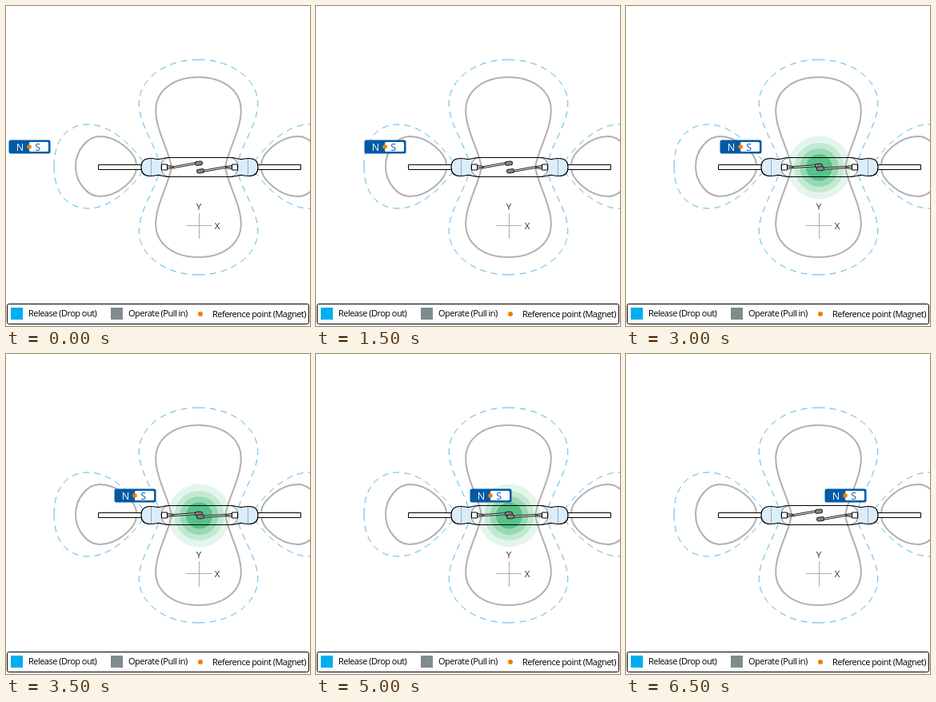
An HTML page with a canvas that plays this animation: 380x400 px, repeating every 8000 ms.

```html
<!DOCTYPE html>
<html lang="en">
<head>
<meta charset="utf-8">
<title>Reed switch and magnet</title>
<style>
html, body { margin: 0; width: 100%; height: 100%; overflow: hidden; background: #fff; }
canvas { display: block; }
</style>
</head>
<body>
<canvas id="stage" width="380" height="400"></canvas>
<script>
const ctx = document.getElementById("stage").getContext("2d");
const LOOP = 8000, STEP = 500, LAST_STEP = 13;
const FONT = '"Open Sans", "Noto Sans", sans-serif';
const GRAY = "#b0b0b0", SKY = "#5bb5e3", NAVY = "#005aa5", ORANGE = "#f08000";

const shapes = {
  operate: new Path2D("M0-112.5C32-112.5 53.3-95 53.3-71C53.3-47 37-21 33.5 0"),
  release: new Path2D("M0-134.5C44-134.5 74.3-108 74.3-80C74.3-52 51-25 48 0"),
  sideOperate: new Path2D("M-154 0C-154-20 -139-37.5-124-37.5C-101-37.5-78-16-78-2V0"),
  sideRelease: new Path2D("M-181 0C-181-35-163-52.5-138-52.5C-111-52.5-86-28-71-8"),
  bulb: new Path2D("M38-12C46-12 48-9.5 53-10C57-11 58-11 62-11C69-11 73-7 73 0V1H48V0C48-5 46-11 38-12Z"),
  outline: new Path2D("M0-12H38C46-12 48-9.5 53-10C57-11 58-11 62-11C69-11 73-7 73 0"),
  glassEnd: new Path2D("M38-12C46-11 48-5 48 0")
};

function at(x, y, draw, sx = 1, sy = 1) {
  ctx.save();
  ctx.translate(x, y);
  ctx.scale(sx, sy);
  draw();
  ctx.restore();
}

function mirrored(x, y, draw) {
  for (const sx of [1, -1]) for (const sy of [1, -1]) at(x, y, draw, sx, sy);
}

function stroke(path, color, width, dash = []) {
  ctx.strokeStyle = color;
  ctx.lineWidth = width;
  ctx.setLineDash(dash);
  ctx.stroke(path);
  ctx.setLineDash([]);
}

function disc(x, y, r, color) {
  ctx.fillStyle = color;
  ctx.beginPath();
  ctx.arc(x, y, r, 0, Math.PI * 2);
  ctx.fill();
}

function box(x, y, w, h, r, fill, line) {
  ctx.beginPath();
  ctx.roundRect(x, y, w, h, r);
  if (fill) { ctx.fillStyle = fill; ctx.fill(); }
  if (line) { ctx.strokeStyle = line; ctx.lineWidth = 1; ctx.stroke(); }
}

function label(text, x, y, size, color, align = "center", spacing = 0) {
  ctx.font = `500 ${size}px ${FONT}`;
  ctx.letterSpacing = spacing + "px";
  ctx.textAlign = align;
  ctx.fillStyle = color;
  ctx.fillText(text, x, y);
}

function halo() {
  disc(241.5, 202, 39.5, "#e4f6ec");
  disc(241.5, 202, 31, "#c2e9d2");
  disc(241.5, 202, 24, "#98d9b4");
  disc(241.5, 202, 16.5, "#56c288");
}

function fields() {
  mirrored(240.5, 201.5, () => {
    stroke(shapes.release, SKY, 1, [8, 6]);
    stroke(shapes.operate, GRAY, 2);
  });
  mirrored(241, 200.5, () => {
    stroke(shapes.sideRelease, SKY, 1, [8, 6]);
    stroke(shapes.sideOperate, GRAY, 2);
  });
}

// Left reed; the right one is the same turned by 180 degrees.
function reed(closed) {
  const tip = closed ? -1.8 : -4.8;
  box(-47.5, -3.5, 7, 7, 0, "#fff", "#000");
  const blade = new Path2D(`M-40-2L-32-1L-5 ${tip - 1}V${tip + 1}L-32 1L-40 2`);
  ctx.fillStyle = "#fff";
  ctx.fill(blade);
  stroke(blade, "#000", 0.9);
  stroke(new Path2D("M-40 0H-32"), "#000", 0.7);
  ctx.save();
  ctx.translate(-1, tip);
  ctx.rotate(closed ? -0.03 : -0.12);
  box(-4.5, -2.4, 9, 4.8, 2.2, "#858585", "#222");
  ctx.restore();
}

function tube(closed) {
  box(115.5, 198.5, 54, 6, 0, "#fff", "#000");
  box(314.5, 198.5, 54, 6, 0, "#fff", "#000");
  mirrored(242, 201.5, () => {
    ctx.fillStyle = "#dbedfb";
    ctx.fill(shapes.bulb);
  });
  mirrored(242, 201.5, () => {
    stroke(new Path2D("M60.5-11V0"), "#8a9aa8", 0.8);
    stroke(shapes.glassEnd, "#555", 0.8);
    stroke(shapes.outline, "#000", 1.2);
  });
  at(242, 201.5, () => reed(closed));
  at(242, 201.5, () => reed(closed), -1, -1);
}

function axes() {
  stroke(new Path2D("M225 274.5H257M241.5 259V291"), "#aaa", 1);
  label("Y", 241, 255, 11.5, "#333");
  label("X", 264, 279, 11.5, "#333");
}

function magnet(step) {
  at(Math.round(3.4 + 18.85 * step), step < 7 ? 167 : 168, () => {
    box(0.5, 0.5, 52, 17, 2.5, NAVY);
    box(26, 3, 24, 12, 1.5, "#fff");
    label("N", 14.5, 13.7, 12.5, "#fff");
    label("S", 36.8, 13.7, 12.5, NAVY);
    disc(26, 9, 2.8, ORANGE);
  });
}

function legend() {
  box(1.5, 372.5, 377, 25, 2, "#fff", "#000");
  box(6, 377, 15, 15, 0, "#00aeef");
  box(131, 377, 15, 15, 0, "#7f8c8d");
  disc(243, 385, 3, ORANGE);
  const item = (text, x, y) => label(text, x, y, 11, "#000", "left", -0.52);
  item("Release (Drop out)", 28, 388);
  item("Operate (Pull in)", 153, 388);
  item("Reference point (Magnet)", 258, 389);
}

function render(time) {
  const step = Math.min(LAST_STEP, Math.floor((time % LOOP) / STEP));
  const closed = step >= 4 && step <= 10;
  ctx.fillStyle = "#fff";
  ctx.fillRect(0, 0, 380, 400);
  if (closed) halo();
  fields();
  tube(closed);
  axes();
  magnet(step);
  legend();
}

const start = performance.now();
function tick() {
  render(performance.now() - start);
  requestAnimationFrame(tick);
}
tick();
</script>
</body>
</html>
```
